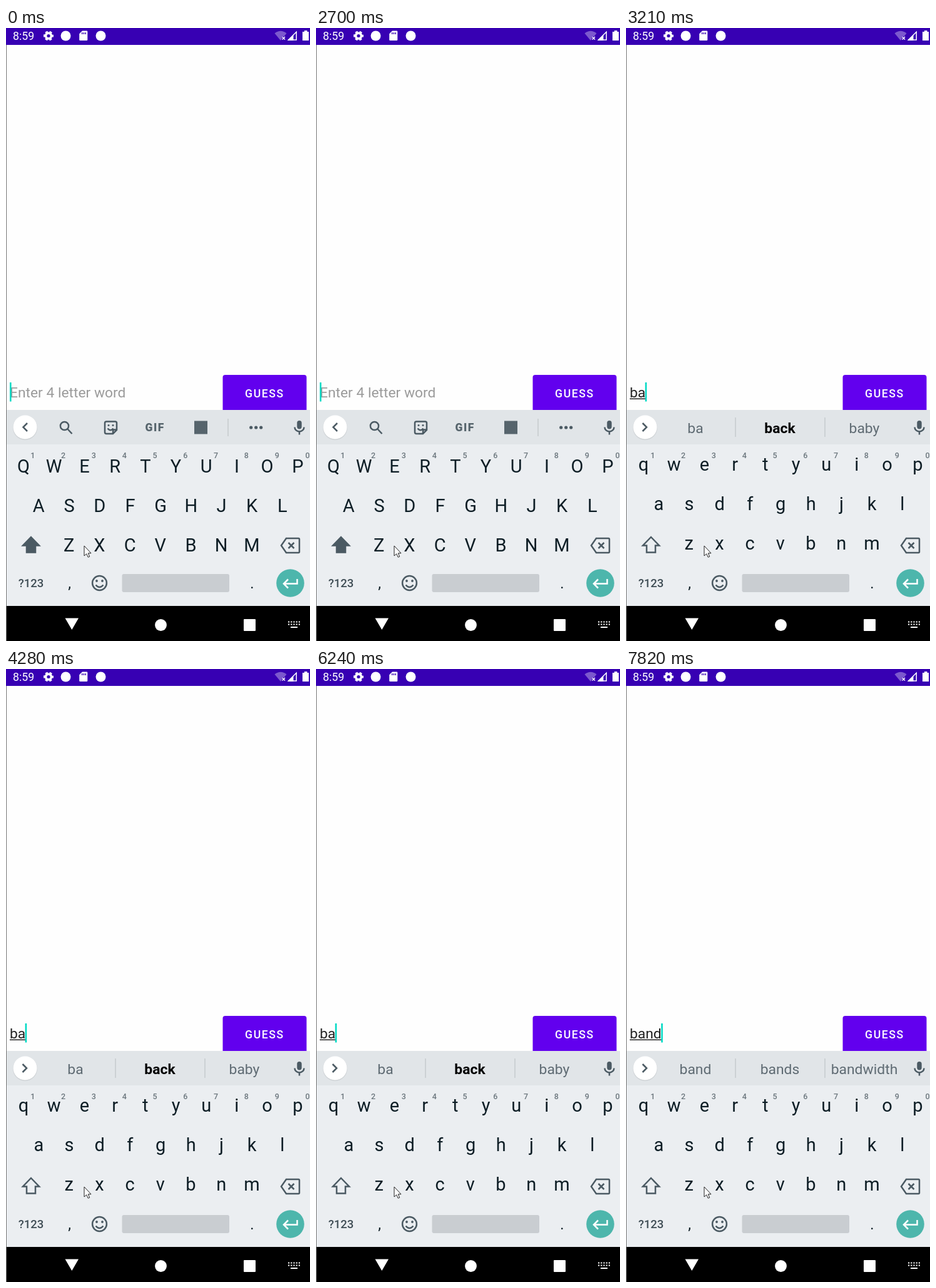
Write an HTML page that moves like this. It is 486 px wide and 979 px high and loops after 8000 ms.

```html
<!DOCTYPE html>
<html lang="en">
<head>
<meta charset="utf-8">
<title>Word guess</title>
<style>
  html, body { margin: 0; width: 100%; height: 100%; overflow: hidden; background: #fff; }
  svg { display: block; width: 486px; height: 979px; font-family: Roboto, sans-serif; }
  .mid { text-anchor: middle; }
  .key { font-size: 29px; fill: #0d1d25; }
  .digit { font-size: 12.5px; font-weight: 500; fill: #6b767d; }
  .word { font-size: 22.9px; fill: #5f6b73; }
  .line { fill: none; stroke: #4b5a63; stroke-width: 2.5; }
</style>
</head>
<body>
<svg viewBox="0 0 486 979">
  <rect width="486" height="979" fill="#fefefe"/>

  <!-- status bar -->
  <rect width="486" height="27" fill="#3700b3"/>
  <g fill="#fff">
    <text x="11" y="19" font-size="17.7">8:59</text>
    <circle cx="68" cy="12.5" r="4.4" fill="none" stroke="#fff" stroke-width="3.6"/>
    <circle cx="68" cy="12.5" r="6.7" fill="none" stroke="#fff" stroke-width="2.6" stroke-dasharray="4 3.016" stroke-dashoffset="2"/>
    <circle cx="95.5" cy="12.5" r="8"/>
    <path d="M122 4.5h7q1.300 0 1.300 1.300v13q0 1.300-1.300 1.300h-10.500q-1.300 0-1.300-1.300v-9.500z"/>
    <path d="M121.700 7v3M124.500 7v3M127.300 7v3" stroke="#3700b3" stroke-width="1.400"/>
    <circle cx="151.500" cy="12.500" r="8"/>
    <path d="M429.500 8.500q9.500-7.500 19 0l-4 5h-3.500v3.500l-2 3z" opacity=".35"/>
    <path d="M441.500 14l4.500 4.500m0-4.500l-4.500 4.500" stroke="#fff" stroke-width="1.500"/>
    <path d="M451.500 19h12.700v-12.700z" fill="none" stroke="#fff" stroke-width="1.500"/>
    <path d="M450 20l9.500-9.500v9.500z"/>
    <path d="M477 4h4.500v2h2.500v14h-10v-14h3z"/>
  </g>

  <!-- entry row -->
  <text id="hint" x="6" y="590" font-size="22.8" fill="#9b9b9b">Enter 4 letter word</text>
  <text id="entry" x="6" y="590" font-size="22.8" fill="#212121"></text>
  <rect id="under" x="6" y="591.500" height="1.500" fill="#212121"/>
  <rect id="caret" y="566" width="2.600" height="30.500" fill="#03dac5"/>
  <path d="M346.500 610v-52q0-4 4-4h126q4 0 4 4v52z" fill="#6200ee"/>
  <text x="382" y="590" font-size="17.700" font-weight="500" letter-spacing="1.580" fill="#fff">GUESS</text>

  <!-- keyboard -->
  <rect y="610" width="486" height="55" fill="#e1e5e8"/>
  <rect y="665" width="486" height="258" fill="#ebeef1"/>
  <circle cx="30.500" cy="638.500" r="19.500" fill="#cfd3d6"/>
  <circle cx="30.500" cy="637.500" r="19" fill="#fff"/>
  <path id="chevron" class="line"/>
  <g id="tools">
    <circle class="line" cx="93.500" cy="635.500" r="6.600"/>
    <path class="line" d="M98.500 640.500l7 7.500"/>
    <path class="line" stroke-width="2.200" d="M160.500 628.500h14q2.500 0 2.500 2.500v11l-6 6h-10.500q-2.500 0-2.500-2.500v-14.500q0-2.500 2.500-2.500zM177 641.500h-3.500q-2.500 0-2.500 2.500v4M162.500 639.500q4.500 5.500 9 0"/>
    <circle cx="164" cy="634.500" r="1.500" fill="#4b5a63"/>
    <circle cx="171" cy="634.500" r="1.500" fill="#4b5a63"/>
    <text x="222.500" y="643.500" font-size="17.500" font-weight="900" letter-spacing="1.500" fill="#56646c">GIF</text>
    <rect x="301" y="627.500" width="21" height="21" fill="#56646c"/>
    <path d="M355 624v28" stroke="#c5cacd" stroke-width="1.500"/>
    <g fill="#4b5a63">
      <circle cx="391.700" cy="638" r="2.600"/><circle cx="399.700" cy="638" r="2.600"/><circle cx="407.700" cy="638" r="2.600"/>
    </g>
  </g>
  <g id="words">
    <path d="M175 622v31M318 622v31" stroke="#c5cacd" stroke-width="1.500"/>
    <text class="word mid" x="111" y="646.500"></text>
    <text class="word mid" x="246" y="646.500"></text>
    <text class="word mid" x="381" y="646.500"></text>
  </g>
  <rect x="465.300" y="627" width="7.400" height="13.500" rx="3.700" fill="#4b5a63"/>
  <path class="line" stroke-width="2.200" d="M461.500 637.500a7.500 7 0 0 0 15 0M469 644.500v5"/>

  <g id="keys"></g>
  <path id="shift" class="line" d="M40 813l13 13.500h-6v11h-14v-11h-6z"/>
  <path class="line" d="M448 815h19.500q1.500 0 1.500 1.500v20q0 1.500-1.500 1.500h-19.500l-8-11.500zM451.500 822l9 9m0-9l-9 9"/>
  <text class="mid" x="40" y="893" font-size="18.500" font-weight="500" fill="#3f4d55">?123</text>
  <text class="mid key" x="101.500" y="895" style="font-size:24px">,</text>
  <text class="mid key" x="393.500" y="895" style="font-size:24px">.</text>
  <circle class="line" cx="149.500" cy="886.500" r="11.400"/>
  <path class="line" d="M143.500 889.500q6 7 12 0"/>
  <circle cx="145" cy="883" r="1.900" fill="#4b5a63"/>
  <circle cx="154" cy="883" r="1.900" fill="#4b5a63"/>
  <rect x="185.500" y="872" width="171.500" height="29" rx="3" fill="#c9cdd1"/>
  <circle cx="454.500" cy="886.500" r="22.300" fill="#4db6ac"/>
  <path d="M465.500 880v7.500h-21M451 880.500l-7 7 7 7" fill="none" stroke="#fff" stroke-width="2.500"/>

  <!-- navigation bar -->
  <rect y="923" width="486" height="56"/>
  <g fill="#fff">
    <path d="M94.500 942.500h21.500l-10.700 18.500z"/>
    <circle cx="247.500" cy="953.500" r="9.400"/>
    <rect x="380" y="944" width="19" height="19" rx="1"/>
    <path d="M451 948.500h19M451 952.500h19" stroke="#fff" stroke-width="2.200" stroke-dasharray="2.200 2"/>
    <path d="M455 957h11" stroke="#fff" stroke-width="2"/>
  </g>
  <path d="M.5 27v952" stroke="#777"/>
  <path d="M125 827v16l3.700-3.300 2.500 5.500 2.500-1-2.400-5.400h4.700z" fill="#fff" stroke="#222"/>
</svg>
<script>
const LOOP = 8000;
const $ = id => document.getElementById(id);
const states = [
  { at: 0, text: '', caret: 6, words: [] },
  { at: 2990, text: 'b', caret: 18.3, words: ['b', 'be', 'but'] },
  { at: 3210, text: 'ba', caret: 30.6, words: ['ba', 'back', 'baby'], bold: true },
  { at: 6420, text: 'ban', caret: 43.3, words: ['ban', 'can', 'bank'] },
  { at: 7820, text: 'band', caret: 56.2, words: ['band', 'bands', 'bandwidth'] }
];
// The caret starts lit and toggles at each of these times.
const blinks = [310, 770, 1220, 1690, 2240, 2700, 3690, 4280, 4750, 5230, 5780, 6240, 6890, 7450];

const rows = [['QWERTYUIOP', 28, 710], ['ASDFGHJKL', 52.3, 773], ['ZXCVBNM', 100.7, 836]];
const letters = [];

function addText(label, x, y, cls) {
  const el = document.createElementNS('http://www.w3.org/2000/svg', 'text');
  el.setAttribute('x', x);
  el.setAttribute('y', y);
  el.setAttribute('class', cls + ' mid');
  el.textContent = label;
  $('keys').append(el);
  return el;
}

for (const [row, x, y] of rows)
  [...row].forEach((letter, i) =>
    letters.push({ letter, y, el: addText(letter, x + 48.7 * i, y, 'key') }));
[...'1234567890'].forEach((n, i) => addText(n, 42.8 + 48.8 * i, 687, 'digit'));

const wordEls = document.querySelectorAll('.word');
const show = (el, on) => el.setAttribute('visibility', on ? 'visible' : 'hidden');
let current;

function setState(s) {
  const typed = s.text !== '';
  $('entry').textContent = s.text;
  $('under').setAttribute('width', typed ? s.caret - 5.2 : 0);
  $('caret').setAttribute('x', s.caret);
  show($('hint'), !typed);
  show($('tools'), !typed);
  show($('words'), typed);
  $('chevron').setAttribute('d', typed ? 'M26.500 631l6.500 6.500-6.500 6.500' : 'M34 631l-6.500 6.500 6.500 6.500');
  $('shift').style.fill = typed ? 'none' : '#4b5a63';
  wordEls.forEach((el, i) => {
    const strong = s.bold && i === 1;
    el.textContent = s.words[i] || '';
    el.style.fontWeight = strong ? 700 : 400;
    el.style.fill = strong ? '#000' : '';
  });
  for (const { letter, y, el } of letters) {
    el.textContent = typed ? letter.toLowerCase() : letter;
    el.setAttribute('y', typed ? y - 3 : y);
  }
}

function draw() {
  const t = performance.now() % LOOP;
  const state = states.findLast(s => s.at <= t);
  if (state !== current) setState(current = state);
  show($('caret'), blinks.filter(b => b <= t).length % 2 === 0);
  requestAnimationFrame(draw);
}
draw();
</script>
</body>
</html>
```
